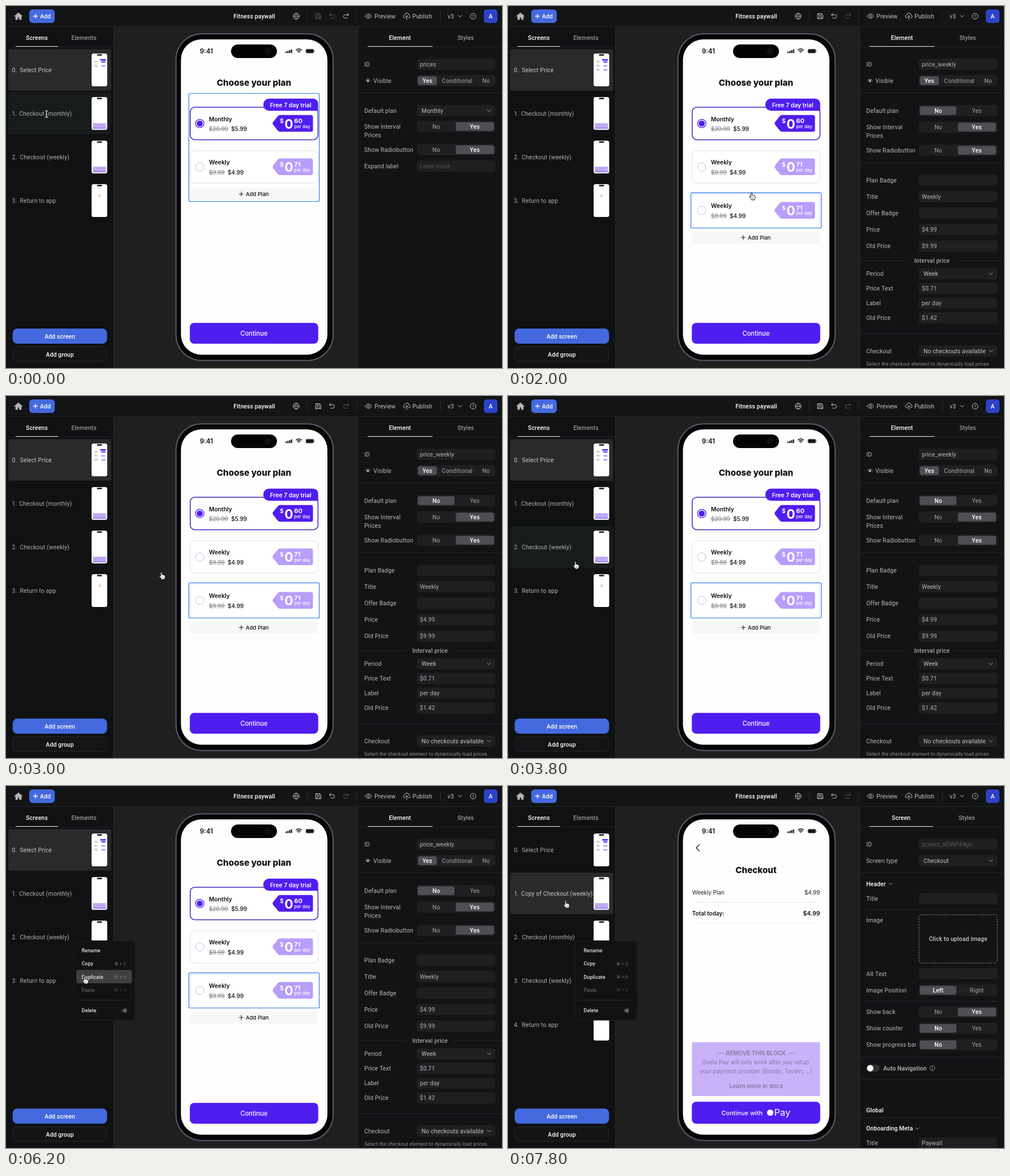
An HTML page with a canvas that plays this animation: 875 px wide and 640 px high, repeating every 8 s.

```html
<!DOCTYPE html>
<html lang="en">
<head>
<meta charset="utf-8">
<title>Paywall editor</title>
<style>
html, body { margin: 0; width: 100%; height: 100%; overflow: hidden; background: #101214; }
canvas { display: block; width: 875px; height: 640px; }
</style>
</head>
<body>
<canvas id="stage"></canvas>
<script>
const W = 875, H = 640, LOOP = 8000, STEP = 200;
const canvas = document.getElementById('stage');
const ratio = window.devicePixelRatio || 1;
canvas.width = W * ratio;
canvas.height = H * ratio;
const c = canvas.getContext('2d');

const UI = 'Roboto, sans-serif', PHONE = 'Inter, sans-serif';
const PURPLE = '#501df0', PALE = '#b89dfa', BLUE = '#4469de', SELECT = '#2f7de6';
const LINE = '#242629', FIELD = '#1d1f21', SOFT = '#b9babc', DIM = '#56585a';

// Moments of the session, in ms
const ADDED = 1600, MENU = 4800, COPIED = 6400, LINES = 6600;

function box(x, y, w, h, r, fill, stroke, lw = 1) {
  c.beginPath();
  c.roundRect(x, y, w, h, r);
  if (fill) { c.fillStyle = fill; c.fill(); }
  if (stroke) { c.strokeStyle = stroke; c.lineWidth = lw; c.stroke(); }
}

function disc(x, y, r, fill, stroke, lw = 1) {
  c.beginPath();
  c.arc(x, y, r, 0, Math.PI * 2);
  if (fill) { c.fillStyle = fill; c.fill(); }
  if (stroke) { c.strokeStyle = stroke; c.lineWidth = lw; c.stroke(); }
}

function path(d, stroke, lw = 1, fill, x = 0, y = 0) {
  const p = new Path2D(d);
  c.save();
  c.translate(x, y);
  c.lineCap = c.lineJoin = 'round';
  if (fill) { c.fillStyle = fill; c.fill(p); }
  if (stroke) { c.strokeStyle = stroke; c.lineWidth = lw; c.stroke(p); }
  c.restore();
}

function rule(x1, x2, y, color = LINE) {
  c.fillStyle = color;
  c.fillRect(x1, y, x2 - x1, 1);
}

// Text with its capitals centred on y
function write(s, x, y, color, size, weight, align, family, space) {
  c.font = `${weight} ${size}px ${family}`;
  c.letterSpacing = space + 'px';
  c.textAlign = align;
  c.fillStyle = color;
  c.fillText(s, x, y + size * 0.36);
  return c.measureText(s).width;
}
const label = (s, x, y, color = SOFT, weight = 400, align = 'left', size = 10.4) =>
  write(s, x, y, color, size, weight, align, UI, 0.13);
const mid = (s, x, y, color = SOFT, weight = 400) => label(s, x, y, color, weight, 'center');
const phoneText = (s, x, y, color = '#111', size = 10, weight = 400, align = 'left') =>
  write(s, x, y, color, size, weight, align, PHONE, 0);

const chevron = (x, y, color = '#a5a6a8') => path('M-3 -1.5L0 1.5L3 -1.5', color, 1, null, x, y);
const plus = (x, y, r, color, lw) => path(`M${-r} 0H${r}M0 ${-r}V${r}`, color, lw, null, x, y);

function topBar(edited) {
  const on = '#c3c4c6', off = '#55575a';
  c.fillStyle = '#121416';
  c.fillRect(0, 0, W, 36);
  rule(0, W, 36);
  path('M0 -6L7 0H5V6H1.5V2H-1.5V6H-5V0H-7Z', on, 0.6, '#b4b5b7', 22, 18);
  box(41, 6, 45, 24, 6, BLUE);
  plus(52, 18, 3.7, '#fff', 1.3);
  label('Add', 60, 18, '#fff', 500);
  mid('Fitness paywall', 438, 18, '#fff', 500);

  disc(512, 18, 5.2, null, on);
  path('M-5 0H5M0 -5Q-4.5 0 0 5Q4.5 0 0 -5', on, 0.8, null, 512, 18);
  for (const x of [531, 618, 766]) {
    c.fillStyle = '#2b2d30';
    c.fillRect(x, 9, 1, 18);
  }
  const past = edited ? on : off, next = edited ? off : on;
  path('M-4.5 -4.5H2.5L4.5 -2.5V4.5H-4.5ZM-2.5 -4.5V-1.5H2V-4.5M-2.5 4.5V1H2.5V4.5', past, 1, null, 551, 18);
  path('M-2 -5L-4.5 -2.5L-2 0M-4.5 -2.5H2Q4.5 -2.5 4.5 .5Q4.5 3.5 2 3.5H-2', past, 1, null, 575, 18);
  path('M2 -5L4.5 -2.5L2 0M4.5 -2.5H-2Q-4.5 -2.5 -4.5 .5Q-4.5 3.5 -2 3.5H2', next, 1, null, 600, 18);

  path('M-6 0Q0 -8 6 0Q0 8 -6 0Z', on, 1, null, 639.5, 18);
  disc(639.5, 18, 1.8, null, on);
  label('Preview', 650, 18, on);
  path('M-3 3H-4Q-6 2.5 -6 0Q-6 -2 -3.5 -2.5Q-2.5 -6 1 -5.5Q4 -5 4 -2Q6 -1.5 6 .5Q6 3 3 3M0 6V-1M-2.2 1.2L0 -1L2.2 1.2', on, 1, null, 707, 18);
  label('Publish', 717, 18, on);
  label('v3', 779, 18, on);
  chevron(801, 18, on);
  disc(824, 18, 5, null, on);
  label('?', 824, 18, on, 400, 'center', 8);
  box(843, 6, 24, 24, 5, '#2c42c8');
  mid('A', 855, 18, '#fff', 500);
}

function tabs(items, from, to) {
  mid(items[0][0], items[0][1], 56.5, '#fff', 500);
  mid(items[1][0], items[1][1], 56.5, '#96989a', 500);
  rule(from, to, 71, '#e8e8e8');
}

function thumb(kind, y, plans) {
  box(151, y, 27.5, 58, 3.5, '#fff');
  box(160.5, y + 1.3, 9, 2.4, 1.2, '#111');
  if (kind === 'price') {
    box(166, y + 10, 10.5, 2.5, 1, PURPLE);
    for (let i = 0; i < plans; i++) {
      const py = y + 13.5 + i * 7;
      box(168, py, 7.5, 2.8, 1, i ? PALE : '#7650ee');
      rule(156, 161, py, '#8a8a96');
      rule(156, 163, py + 2, '#d0d0d8');
    }
  } else if (kind === 'pay') {
    box(153, y + 46, 23.5, 10, 1, '#c5aff8');
    rule(157, 173, y + 48, '#b7a0ea');
    rule(156, 174, y + 50, '#b7a0ea');
    box(153, y + 53.5, 23.5, 2.8, 1, '#a98af0');
  } else {
    path('M-2 3L-.5 -1L2 1.5Z', null, 0, '#e9b25c', 165, y + 20);
    disc(167, y + 18.5, 0.7, '#b779d8');
    disc(164, y + 18, 0.6, '#e2715f');
  }
}

function leftPanel(s) {
  c.fillStyle = '#0f1113';
  c.fillRect(0, 37, 189, H - 37);
  c.fillStyle = LINE;
  c.fillRect(189, 37, 1, H - 37);
  tabs([['Screens', 54.5], ['Elements', 137.5]], 17, 92);
  rule(0, 189, 72, '#1f2124');

  const rows = [['Select Price', 'price'], ['Checkout (monthly)', 'pay'],
    ['Checkout (weekly)', 'pay'], ['Return to app', 'end']];
  if (s.copied) rows.splice(1, 0, ['Copy of Checkout (weekly)', 'pay']);
  const active = s.copied ? 1 : 0;
  rows.forEach(([name, kind], i) => {
    const y = 76.2 + i * 77.1;
    if (i === active) box(4, y, 181.5, 73.5, 3, '#2a2a2c');
    else if (i === s.row) box(4, y, 181.5, 73.5, 3, '#171b1c');
    const color = i === active ? '#c9cacc' : '#aeb0b2';
    label(i + '.', 10.5, y + 37.2, color);
    label(name, i === 1 ? 23 : 24.5, y + 37.2, color);
    thumb(kind, Math.round(y + 7.8), s.added ? 3 : 2);
  });

  box(11.7, 570.3, 166.6, 26.6, 8, BLUE);
  mid('Add screen', 95, 583.8, '#fff', 500);
  box(12.2, 602.5, 165.6, 25.6, 8, '#121416', '#282a2d');
  mid('Add group', 95, 615.8, '#fff', 500);
}

function phoneFrame() {
  box(298.6, 48, 279.8, 580, 46, '#3a3542');
  box(300, 49.4, 277, 577.2, 45, '#060607', '#5f566b', 1.8);
  box(304, 53.4, 269, 569.2, 41, '#050506');
  box(308.6, 59, 258.4, 557.6, 36, '#fefefe');
  box(397, 68, 81, 24, 12, '#030304');
  disc(462, 80, 6, '#0e0e14');
  phoneText('9:41', 353.5, 80.3, '#111', 11.4, 600, 'center');
  for (let i = 0; i < 4; i++) box(493 + i * 3.2, 80.6 - i * 1.3, 2.2, 2.7 + i * 1.3, 0.6, '#111');
  path('M-4.6 -1.3Q0 -5 4.6 -1.3M-2.6 .9Q0 -1.3 2.6 .9', '#111', 1.5, null, 516.5, 79);
  disc(516.5, 81.7, 1.1, '#111');
  box(529, 76.2, 14, 7, 2, '#15151c', '#8c8c92', 0.8);
  box(544, 78.2, 1, 3, 0.5, '#8c8c92');
}

function planCard(i, title, old, price, cents) {
  const y = 179 + i * 76.8, mainPlan = i === 0, color = mainPlan ? PURPLE : PALE;
  box(325, y, 225.4, 57.4, 8, '#fff', mainPlan ? '#4424c0' : '#e8e5f2', mainPlan ? 1.5 : 1.2);
  if (mainPlan) {
    box(454, 163.7, 96.7, 21.6, [10, 9, 0, 10], PURPLE);
    phoneText('Free 7 day trial', 502.2, 174.8, '#fff', 10.3, 600, 'center');
  }
  disc(341.8, y + 28.8, 7.4, '#fff', mainPlan ? PURPLE : '#c5bddf', mainPlan ? 1.3 : 1);
  if (mainPlan) disc(341.8, y + 28.8, 5.3, PURPLE);
  phoneText(title, 358, y + 20.8, '#111', 10.3, 600);
  const w = phoneText(old, 358, y + 38.5, '#77777d', 10);
  rule(358, 358 + w, y + 38, '#77777d');
  phoneText(price, 358 + w + 5.5, y + 38.5, '#111', 10, 500);

  path('M1 12.5L9.5 2Q11 0 13.5 0H68Q71.5 0 71.5 3.5V26Q71.5 29.5 68 29.5H13.5Q11 29.5 9.5 27.5L1 17Q-.8 14.7 1 12.5Z',
    null, 0, color, 470, y + 13.8);
  phoneText('$', 483, y + 24.5, '#fff', 10.5, 600);
  phoneText('0', 499, y + 29.3, '#fff', 23, 700, 'center');
  phoneText(cents, 508.3, y + 24.3, '#fff', 11, 700);
  phoneText('per day', 508.3, y + 34, '#fff', 7.9, 500);
}

function priceScreen(s) {
  phoneText('Choose your plan', 437.5, 136, '#111', 15.2, 800, 'center');
  planCard(0, 'Monthly', '$20.99', '$5.99', '60');
  planCard(1, 'Weekly', '$9.99', '$4.99', '71');
  if (s.added) planCard(2, 'Weekly', '$9.99', '$4.99', '71');
  const y = s.added ? 398.6 : 321.8;
  box(325, y, 225, 21.5, 2, '#f7f7f8');
  plus(415, y + 10.7, 3.8, '#222', 1.1);
  phoneText('Add Plan', 423, y + 10.8, '#111', 9.5, 500);

  if (s.card >= 0) box(322.5, 176.5 + s.card * 76.8, 230, 62.5, 2, null, '#a6c2ea', 1);
  if (s.added) box(322.6, 330.3, 230, 62.2, 2, null, SELECT, 1.2);
  else box(322.6, 154.5, 230, 191, 3, null, SELECT, 1.2);
  box(324.3, 560.2, 226.5, 36.8, 7.5, PURPLE);
  phoneText('Continue', 437.5, 578.8, '#fff', 11.1, 500, 'center');
}

function checkoutScreen(s) {
  path('M3 -5.5L-2.5 0L3 5.5', '#111', 1.4, null, 334.5, 109.3);
  phoneText('Checkout', 437.5, 149, '#111', 15.2, 800, 'center');
  phoneText('Weekly Plan', 324.8, 188.5, '#222', 9.9);
  phoneText('$4.99', 550.3, 188.5, '#222', 9.9, 400, 'right');
  phoneText('Total today:', 324.8, 225.3, '#111', 10, 600);
  phoneText('$4.99', 550.3, 225.3, '#111', 10.4, 600, 'right');
  if (s.lines) {
    rule(325, 550, 205, '#ececee');
    rule(325, 550, 242, '#ececee');
  }
  c.fillStyle = '#c8b3fa';
  c.fillRect(324.5, 453, 226, 95);
  const ink = '#85769f';
  phoneText('--- REMOVE THIS BLOCK ---', 437.5, 472, ink, 10.1, 600, 'center');
  phoneText('Ovelo Pay will only work after you setup', 436.5, 488, ink, 10, 400, 'center');
  phoneText('your payment provider (Brindo, Tavlen, ...)', 437.5, 504, ink, 10, 400, 'center');
  phoneText('Learn more in docs', 437.5, 530, ink, 10.2, 600, 'center');
  box(324.3, 558.3, 226.5, 38.7, 7.5, PURPLE);
  phoneText('Continue with', 376.5, 578, '#fff', 11, 500);
  disc(462.5, 577.5, 5.6, '#fff');
  phoneText('Pay', 469.5, 577.5, '#fff', 16.4, 400);
}

// Rows of the property panel
function field(name, y, value = '', color = '#b4b5b7') {
  if (name) label(name, 632, y);
  box(724.5, y - 10, 139, 20, 5, FIELD);
  label(value, 730, y, color);
}

function dropdown(name, y, value) {
  label(name, 632, y);
  box(724.5, y - 10, 139, 20, 5, FIELD);
  label(value, 733, y, '#c2c3c5');
  chevron(852, y);
}

function toggle(name, y, yes, left = 'No', right = 'Yes') {
  label(name, 632, y);
  box(724.5, y - 10, 139, 20, 5, FIELD);
  box(yes ? 793.5 : 726.5, y - 7.8, yes ? 67.5 : 64.5, 15.6, 3.5, '#4d4f52');
  mid(left, 759, y, yes ? '#a4a6a8' : '#fff', yes ? 400 : 500);
  mid(right, 827, y, yes ? '#fff' : '#a4a6a8', yes ? 500 : 400);
}

function elementPanel(s) {
  tabs([['Element', 695], ['Styles', 811]], 638, 752.5);
  field('ID', 103, s.added ? 'price_weekly' : 'prices');
  path('M-4.5 .5Q0 -5 4.5 .5', SOFT, 1, null, 638.5, 131.5);
  disc(638.5, 132.7, 2, SOFT);
  label('Visible', 648, 132);
  box(724.5, 122, 139, 20, 5, FIELD);
  box(726.5, 124.2, 33.5, 15.6, 3.5, '#4d4f52');
  mid('Yes', 743.3, 132, '#fff', 500);
  mid('Conditional', 796, 132, '#a4a6a8');
  mid('No', 847, 132, '#a4a6a8');
  rule(621, W, 153);

  const d = s.added ? 1 : 0;
  if (s.added) toggle('Default plan', 185, false);
  else dropdown('Default plan', 185, 'Monthly');
  toggle('Show Interval', 213 + d, true);
  label('Prices', 632, 228 + d);
  toggle('Show Radiobutton', 254 + d, true);
  if (!s.added) return field('Expand label', 283, 'Learn more', DIM);

  rule(621, W, 277);
  [['Plan Badge'], ['Title', 'Weekly'], ['Offer Badge'], ['Price', '$4.99'], ['Old Price', '$9.99']]
    .forEach(([name, value], i) => field(name, 308 + i * 29.1, value));
  rule(621, 705, 450);
  rule(790, W, 450);
  mid('Interval price', 748, 450.5, '#a2a4a6', 500);
  dropdown('Period', 473.5, 'Week');
  [['Price Text', '$0.71'], ['Label', 'per day'], ['Old Price', '$1.42']]
    .forEach(([name, value], i) => field(name, 499.3 + i * 26.1, value));
  rule(621, W, 579);
  dropdown('Checkout', 610, 'No checkouts available');
  label('Select the checkout element to dynamically load prices.', 632, 632.5, '#8d8f91', 400, 'left', 8.6);
}

function screenPanel() {
  tabs([['Screen', 693.5], ['Styles', 809.5]], 637.5, 750);
  field('ID', 103, 'screen_aDWP44gn', DIM);
  dropdown('Screen type', 132, 'Checkout');
  rule(621, W, 153);
  label('Header', 632, 173, '#fff', 500);
  chevron(675, 173);
  field('Title', 199);
  rule(632, 863, 218);
  label('Image', 632, 237.5);
  c.setLineDash([2.5, 2]);
  box(725, 227.5, 138, 85.5, 4, null, '#8c8e90');
  c.setLineDash([]);
  mid('Click to upload image', 794, 270.5, '#c9cacc', 500);
  field('Alt Text', 332);
  toggle('Image Position', 361, false, 'Left', 'Right');
  rule(632, 863, 380);
  toggle('Show back', 399.5, true);
  toggle('Show counter', 428.5, false);
  toggle('Show progress bar', 457.5, false);
  rule(621, W, 479);
  box(632, 492.5, 24, 13, 6.5, '#2e3033');
  disc(639, 499, 5.7, '#fff');
  label('Auto Navigation', 662, 499.3, SOFT, 500);
  disc(748.5, 499, 4.3, null, '#a5a6a8', 0.9);
  path('M0 -.3V2M0 -2V-1.9', '#a5a6a8', 0.9, null, 748.5, 499);
  rule(621, W, 518);
  label('Global', 632, 573, '#fff', 500);
  rule(621, W, 586);
  label('Onboarding Meta', 632, 605.5, '#fff', 500);
  chevron(722, 605.5);
  field('Title', 631.5, 'Paywall');
}

function contextMenu(hot) {
  const item = (s, y, color) => label(s, 133.5, y, color, 500, 'left', 8.8);
  box(119, 273.5, 109, 140.5, 5, '#101214', '#1d2023');
  if (hot >= 0) box(124, 325.3 + (hot - 2) * 23.3, 98.5, 23.5, 4, '#3d3f41');
  ['Rename', 'Copy', 'Duplicate', 'Paste'].forEach((name, i) => {
    const y = 291 + i * 23.2, dim = i === 3;
    item(name, y, dim ? '#606264' : '#e6e7e9');
    if (i) label('⌘ + ' + ' CDV'[i], 212, y, dim ? '#47494b' : '#75777a', 400, 'right', 7.6);
  });
  rule(125, 222, 378, '#2a2c2f');
  item('Delete', 397, '#e6e7e9');
  path('M-4 0L-1.5 -2.8H3.5V2.8H-1.5Z', '#77797c', 0.8, '#4b4d50', 209, 397);
  path('M0 -1L2 1M2 -1L0 1', '#a0a2a4', 0.7, null, 209, 397);
}

// Pointer: start, end, destination
const moves = [[0, 1200, 427, 322], [1200, 1500, 431, 336], [2400, 3600, 120, 299],
  [4200, 4600, 120, 280], [4900, 5900, 140, 343], [6600, 7600, 103, 209]];

function pointerAt(t) {
  let x = 71, y = 190;
  for (const [a, b, nx, ny] of moves) {
    const k = Math.min(1, Math.max(0, (t - a) / (b - a)));
    const e = k * k * (3 - 2 * k);
    x += (nx - x) * e;
    y += (ny - y) * e;
  }
  return { x, y };
}

function drawPointer(p, beam) {
  if (beam) {
    const d = 'M-2.5 -6Q0 -6 0 -4Q0 -6 2.5 -6M0 -4V4.5M-2.5 6Q0 6 0 4.5Q0 6 2.5 6M-1.5 1H1.5';
    path(d, '#111', 2.2, null, p.x + 0.5, p.y + 1);
    return path(d, '#f2f2f2', 1.1, null, p.x + 0.5, p.y + 1);
  }
  path('M-2.6 1.2V-5Q-2.6 -6.3 -1.4 -6.3Q-.3 -6.3 -.3 -5V-1.6Q1.4 -2.4 1.8 -1.1Q3.3 -1.7 3.6 -.4Q5.2 -.7 5.2 1V3Q5.2 4.5 4.2 5.6V6.8H-1.6V5.8L-4.8 1.7Q-5.4 .4 -4.3 .1Q-3.4 0 -2.6 1.2Z',
    '#16161a', 1, '#fff', p.x, p.y);
  path('M.4 2.4V4.8M2 2.4V4.8', '#444', 0.6, null, p.x, p.y);
}

function draw(t) {
  const p = pointerAt(t), tipX = p.x - 1, tipY = p.y - 6;
  const menu = t >= MENU;
  const s = { added: t >= ADDED, copied: t >= COPIED, lines: t >= LINES, row: -1, card: -1 };
  const row = Math.floor((p.y - 76) / 77.1);
  if (!menu && p.x < 186 && row >= 0 && row < 4) s.row = row;
  if (tipX > 322 && tipX < 553) {
    const n = Math.floor((tipY - 176) / 76.8);
    if (n >= 0 && n < (s.added ? 3 : 2) && tipY - 176 - n * 76.8 < 64) s.card = n;
  }
  let hot = -1;
  if (menu && tipX > 119 && tipY > 279 && tipY < 372) hot = Math.floor((tipY - 279) / 23.3);

  c.setTransform(ratio, 0, 0, ratio, 0, 0);
  c.fillStyle = '#1f1f1f';
  c.fillRect(0, 0, W, H);
  leftPanel(s);
  phoneFrame();
  if (s.copied) checkoutScreen(s);
  else priceScreen(s);
  c.fillStyle = '#111315';
  c.fillRect(620, 37, W - 620, H - 37);
  c.fillStyle = LINE;
  c.fillRect(620, 37, 1, H - 37);
  rule(621, W, 72, '#1f2124');
  if (s.copied) screenPanel();
  else elementPanel(s);
  topBar(s.added);
  if (menu) contextMenu(hot);

  const onText = s.row >= 0 && p.x < 116 && Math.abs(p.y - (113.3 + s.row * 77.1)) < 8;
  drawPointer(p, onText);
}

const start = performance.now();
function tick() {
  const t = (performance.now() - start) % LOOP;
  draw(Math.floor(t / STEP) * STEP);
  requestAnimationFrame(tick);
}
tick();
</script>
</body>
</html>
```
